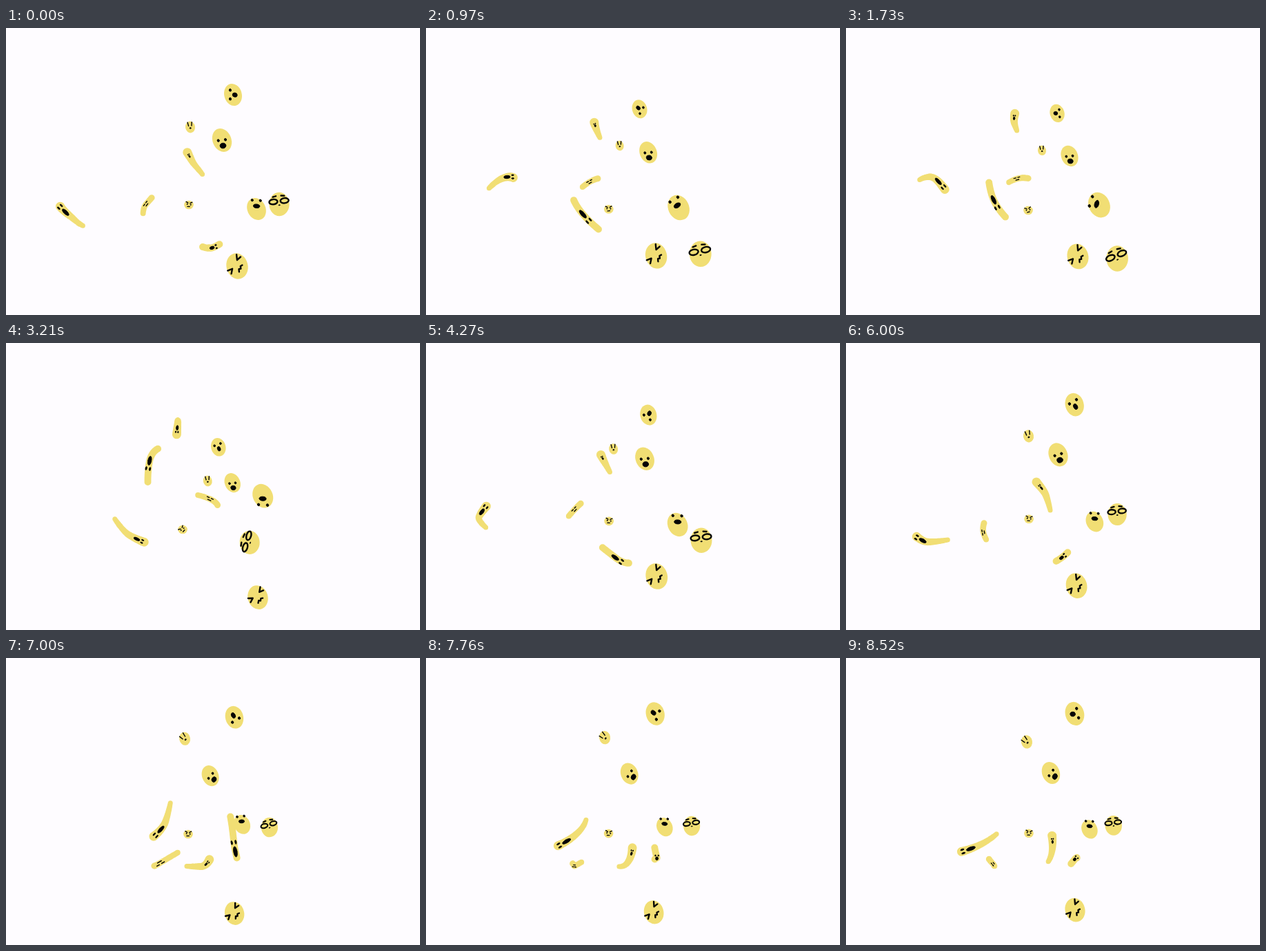
An HTML page with a canvas that plays this animation: 600 by 417 pixels, repeating every 8560 ms.

```html
<!DOCTYPE html>
<html>
<head>
<meta charset="utf-8">
<style>
html, body { margin: 0; height: 100%; overflow: hidden; background: #fefcff; }
canvas { display: block; }
</style>
</head>
<body>
<canvas id="stage" width="600" height="417"></canvas>
<script>
const ctx = document.getElementById('stage').getContext('2d');
const LOOP = 8560, CYCLE = 800, RAMP = 672;
const TAU = Math.PI * 2, RAD = Math.PI / 180;
const REACH = .055; // share of a cycle a limb smears each way

// Faces, in units of body radius: dots and rings [x, y, rx, ry], polylines.
const eyes = (x, y, r) => [[-x, y, r, r], [x, y, r, r]];
const faces = {
  head: { dots: [...eyes(.42, -.3, .12), [0, .2, .2, .26]] },
  sleepy: { dots: [[0, .3, .14, .1]], lines: [[-.42, -.75, -.3, -.1], [.42, -.75, .3, -.1]] },
  shout: { dots: [...eyes(.36, -.25, .11), [0, .25, .3, .23]] },
  gape: { dots: [...eyes(.42, -.36, .11), [0, .18, .33, .18]] },
  limb: { dots: [...eyes(.4, -.5, .14), [0, .15, .36, .36]] },
  calm: { lines: [[-.4, -.3, -.1, -.28], [.15, -.3, .42, -.28], [-.2, .3, .22, .3]] },
  cross: {
    dots: eyes(.38, -.1, .09),
    lines: [[-.7, -.6, -.25, -.4], [.2, -.42, .6, -.7], [-.25, .42, .25, .36]]
  },
  glasses: {
    dots: [[0, .26, .07, .03]],
    rings: [[-.54, -.08, .4, .22], [.54, -.08, .4, .22]],
    lines: [[-.55, -.5, -.25, -.55], [.25, -.55, .55, -.5]]
  },
  wince: {
    lines: [[-.78, -.52, -.42, -.25, -.82, -.12], [.78, -.52, .42, -.25, .82, -.12],
      [-.3, .38, -.12, .25, 0, .38, .16, .25, .32, .34]]
  }
};

// Paths: key points [cycle, x, y] of closed curves.
const swing = [
  [0, 95, 275], [.08, 121, 289], [.23, 193, 272], [.33, 231, 238], [.59, 249, 116],
  [.743, 244, 138], [1, 270, 194], [1.08, 290, 222], [1.23, 299, 277], [1.33, 282, 303],
  [1.59, 180, 280], [1.743, 125, 217], [1.918, 77, 252]
];

// Round bodies swell by pulse around swellAt; faces spin, or nod around nodAt.
const balls = [
  { face: 'head', size: [15.3, 12], tilt: 75, pulse: .14, swellAt: .18, turn: -88, spin: 720,
    path: [[0, 329, 97], [.2, 331, 82], [.33, 331, 86], [.59, 308, 151], [.743, 306, 124]] },
  { face: 'sleepy', size: [8.5, 7], tilt: 80, pulse: .15, swellAt: .25, turn: -5, nod: -45, nodAt: .27, lift: 1,
    path: [[0, 267, 144], [.23, 262, 122], [.33, 259, 117], [.59, 292, 200], [.743, 284, 178]] },
  { face: 'shout', size: [16, 12.3], tilt: 68, pulse: .1, swellAt: .03, turn: -8, nod: -45, nodAt: .27, lift: -4,
    path: [[0, 313, 163], [.23, 297, 167], [.33, 296, 171], [.59, 328, 203], [.743, 324, 186]] },
  { face: 'cross', size: [6.8, 6.3], turn: 10, nod: -50, nodAt: .59,
    path: [[0, 265, 257], [.33, 264, 256], [.59, 256, 271], [.743, 264, 265]] },
  { face: 'gape', size: [16.5, 13.2], tilt: 65, pulse: .15, swellAt: .75, nod: -180, nodAt: .59, lift: 7,
    path: [[0, 363, 263], [.23, 353, 249], [.33, 342, 242], [.59, 372, 222], [.743, 367, 257]] },
  { face: 'glasses', size: [16.5, 14], tilt: 88, pulse: .14, swellAt: .8, turn: -6, nod: -70, nodAt: .55, lift: 3,
    path: [[0, 396, 256], [.33, 382, 246], [.59, 353, 289], [.743, 393, 335], [.918, 399, 287]] },
  { face: 'wince', size: [18, 14.8], tilt: 75, pulse: .06, swellAt: .9, turn: -58, nod: 25, nodAt: .5,
    path: [[0, 335, 346], [.23, 332, 366], [.33, 331, 371], [.59, 365, 370], [.743, 336, 332]] }
];

// Limbs smear along their path, from the tail radius to the front radius.
const limbs = [
  { face: 'limb', tail: 6.5, front: 3.5, facing: 180, slide: -.6, period: 2, path: swing },
  { face: 'limb', tail: 6.5, front: 3.5, facing: 180, slide: -.6, period: 2, path: swing, lead: 1 },
  { face: 'calm', tail: 4.5, front: 4, facing: 90,
    path: [[0, 203, 256], [.08, 199, 275], [.23, 213, 299], [.33, 223, 298], [.5, 304, 245],
      [.59, 296, 227], [.743, 248, 219]] },
  { face: 'limb', tail: 5, front: 5, facing: 0,
    path: [[0, 300, 319], [.23, 332, 292], [.33, 332, 279], [.43, 310, 190], [.51, 235, 152],
      [.59, 208, 172], [.743, 215, 252], [.918, 276, 313]] }
];

// The wheel spins up to full speed, then turns evenly.
const phase = t => t < RAMP ? t * t / (2 * RAMP * CYCLE) : (t - RAMP / 2) / CYCLE;
const swell = (u, at) => Math.cos(TAU * (u - at));

// Smooth closed curve through the key points.
function along(path, u, period = 1) {
  const n = path.length;
  u = (u % period + period) % period;
  const key = j => {
    const [k, x, y] = path[(j + n) % n];
    return [k + period * Math.floor(j / n), x, y];
  };
  let i = n - 1;
  while (path[i][0] > u) i--;
  const [p, a, b, q] = [i - 1, i, i + 1, i + 2].map(key);
  const span = b[0] - a[0], s = (u - a[0]) / span;
  return [1, 2].map(c => {
    const v0 = (b[c] - p[c]) / (b[0] - p[0]) * span;
    const v1 = (q[c] - a[c]) / (q[0] - a[0]) * span;
    const d = b[c] - a[c];
    return a[c] + s * (v0 + s * (3 * d - 2 * v0 - v1 + s * (v0 + v1 - 2 * d)));
  });
}

// Draws a face stretched like its body: up is the way the brow points.
function drawFace({ dots = [], rings = [], lines = [] }, x, y, long, wide, tilt, up, lift = 0, size = 1) {
  const mean = Math.sqrt(long * wide), squash = (long / mean) ** .6;
  const weight = Math.min(2.4, Math.max(1.4, mean * .16));
  const ink = (trace, width, fill) => {
    ctx.save();
    ctx.translate(x + lift * Math.sin(up), y - lift * Math.cos(up));
    ctx.rotate(tilt);
    ctx.scale(mean * squash * size, mean / squash * size);
    ctx.rotate(up - tilt);
    ctx.beginPath();
    trace();
    ctx.restore();
    ctx.lineWidth = width;
    ctx.stroke();
    if (fill) ctx.fill();
  };
  const oval = ([cx, cy, rx, ry]) => () => ctx.ellipse(cx, cy, rx, ry, 0, 0, TAU);
  ctx.fillStyle = ctx.strokeStyle = '#050505';
  ctx.lineCap = ctx.lineJoin = 'round';
  dots.forEach(d => ink(oval(d), 1, true));
  rings.forEach(r => ink(oval(r), weight));
  lines.forEach(p => ink(() => {
    for (let i = 0; i < p.length; i += 2) ctx.lineTo(p[i], p[i + 1]);
  }, weight));
}

function drawBall({ face, path, size, tilt = 0, pulse = 0, swellAt = 0, turn = 0, spin = 0, nod = 0, nodAt = 0, lift }, u) {
  const [x, y] = along(path, u);
  const [long, wide] = size.map(r => r * (1 + pulse * swell(u, swellAt)));
  const bow = ((1 + swell(u, nodAt)) / 2) ** 4;
  ctx.fillStyle = '#f1de74';
  ctx.beginPath();
  ctx.ellipse(x, y, long, wide, tilt * RAD, 0, TAU);
  ctx.fill();
  drawFace(faces[face], x, y, long, wide, tilt * RAD, (turn + spin * u + nod * bow) * RAD, lift);
}

function drawLimb({ face, path, period = 1, lead = 0, tail, front, facing, slide = 0 }, turn) {
  const u = turn + lead, at = s => along(path, u + s * REACH, period);
  ctx.fillStyle = '#f1de74';
  ctx.beginPath();
  for (let s = -1; s <= 1; s += 1 / 24) {
    const [x, y] = at(s), r = tail + (front - tail) * (s + 1) / 2;
    ctx.moveTo(x + r, y);
    ctx.arc(x, y, r, 0, TAU);
  }
  ctx.fill();
  const [x, y] = at(slide), [x0, y0] = at(slide - .3), [x1, y1] = at(slide + .3);
  const tilt = Math.atan2(y1 - y0, x1 - x0);
  const long = Math.max(7, Math.hypot(x1 - x0, y1 - y0) / .6);
  // On the two-cycle path the face shrinks on the far side.
  const scale = period > 1 ? .4 + .3 * (1 + swell(u / 2, .02)) : 1;
  drawFace(faces[face], x, y, long, (tail + front) / 2, tilt, tilt + (facing + 90) * RAD, 0, scale);
}

const start = performance.now();
function frame() {
  const u = phase((performance.now() - start) % LOOP);
  ctx.fillStyle = '#fefcff';
  ctx.fillRect(0, 0, 600, 417);
  limbs.forEach(limb => drawLimb(limb, u));
  balls.forEach(ball => drawBall(ball, u));
  requestAnimationFrame(frame);
}
frame();
</script>
</body>
</html>
```
